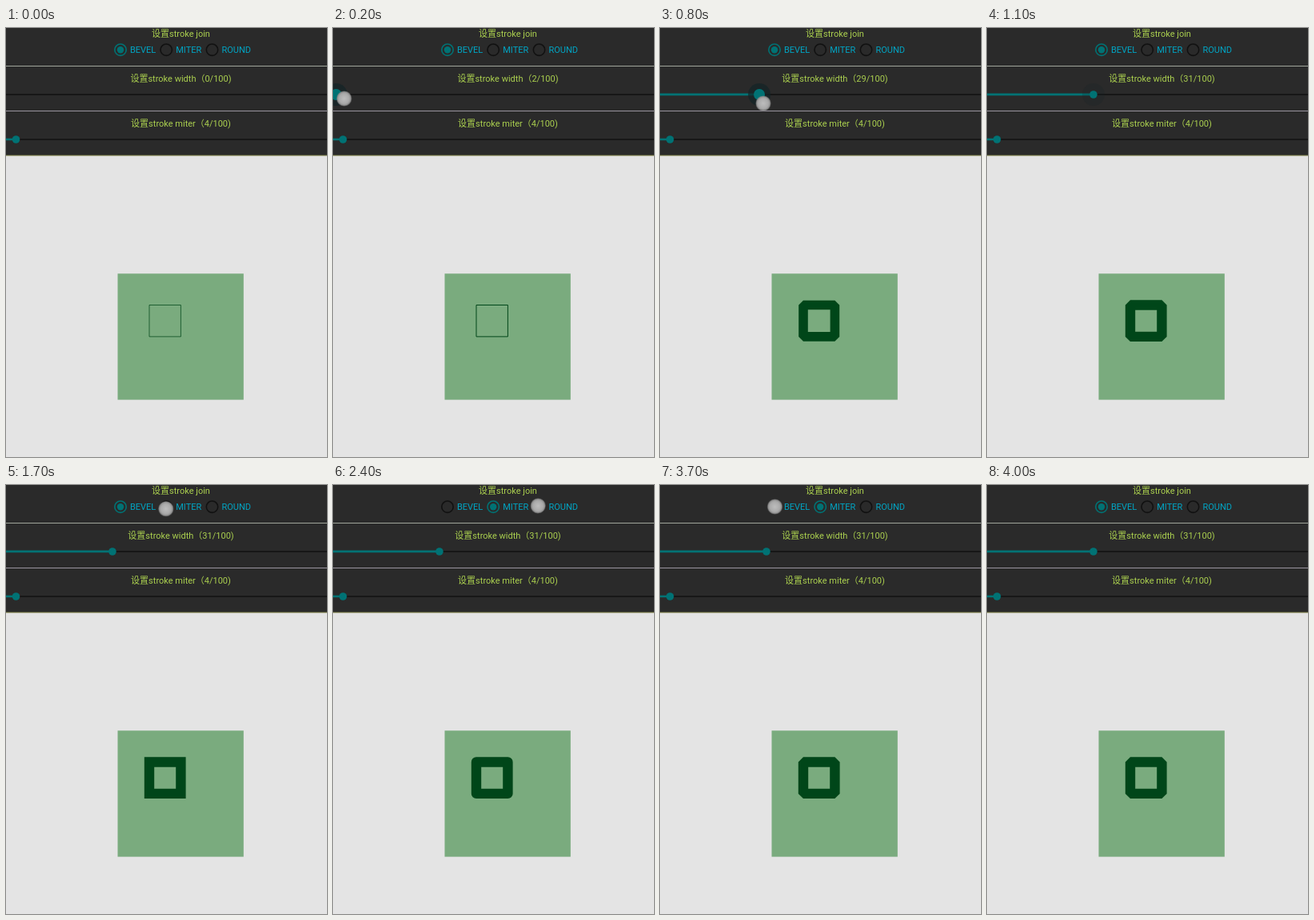
An HTML page that plays this animation: 401x535 px, repeating every 6.9 s.

```html
<!DOCTYPE html>
<html lang="zh">
<head>
<meta charset="utf-8">
<title>Stroke join</title>
<style>
  html, body { margin: 0; width: 100%; height: 100%; overflow: hidden; background: #e4e4e4; }
  svg { display: block; width: 100vw; height: 100vh; }
  text { font: 11px Roboto, "Noto Sans CJK SC", "Noto Sans CJK", sans-serif; fill: #abd04f; }
  .title { text-anchor: middle; }
  .label { fill: #00a5c4; }
  .track { fill: #121212; }
  .teal { fill: #007274; }
  .ring { fill: none; stroke-width: 1.6; }
</style>
</head>
<body>
<svg viewBox="0 0 401 535" preserveAspectRatio="none">
  <defs>
    <radialGradient id="finger">
      <stop offset="0" stop-color="#bdbdbd"/>
      <stop offset=".65" stop-color="#a9a9a9"/>
      <stop offset=".85" stop-color="#8f8f8f"/>
      <stop offset="1" stop-color="#777" stop-opacity=".25"/>
    </radialGradient>
  </defs>
  <rect width="401" height="535" fill="#e4e4e4"/>
  <rect width="401" height="159" fill="#2a2a2a"/>
  <rect y="47" width="401" height="1" fill="#a0a59b"/>
  <rect y="103" width="401" height="1" fill="#99949f"/>
  <rect y="158.5" width="401" height="1" fill="#85874d"/>

  <text class="title" x="218.5" y="11">设置stroke join</text>
  <g id="radios"></g>

  <text class="title" x="218.5" y="67" id="widthText"></text>
  <rect class="track" y="82.2" width="401" height="1.5"/>
  <rect class="teal" y="81.5" height="2.8" id="widthBar"/>
  <circle cy="83" r="14" fill="#122426" id="halo"/>
  <circle class="teal" cy="83" id="thumb"/>

  <text class="title" x="218.5" y="123">设置stroke miter（4/100)</text>
  <rect class="track" y="138.2" width="401" height="1.5"/>
  <rect class="teal" y="137.6" width="12.5" height="2.6"/>
  <circle class="teal" cx="12.5" cy="139" r="4.8"/>

  <rect x="139.5" y="306.3" width="157.3" height="157.3" fill="#7aab7e"/>
  <path id="square" d="M179 345.5h39.4v39.4h-39.4z" fill="none" stroke="#004619"/>
  <circle id="touch" r="9.8" fill="url(#finger)"/>
</svg>
<script>
const LOOP = 6900, STEP = 100;
const $ = id => document.getElementById(id);
const set = (el, attrs) => { for (const k in attrs) el.setAttribute(k, attrs[k]); };
const add = (tag, attrs) => {
  const el = document.createElementNS('http://www.w3.org/2000/svg', tag);
  set(el, attrs);
  return $('radios').appendChild(el);
};

const radios = [['BEVEL', 143], ['MITER', 200.2], ['ROUND', 257.5]].map(([name, cx]) => {
  add('text', { class: 'label', x: cx + 12, y: 31.3 }).textContent = name;
  return {
    ring: add('circle', { class: 'ring', cx, cy: 27.2, r: 7.2 }),
    dot: add('circle', { class: 'teal', cx, cy: 27.2 })
  };
});

// Stroke width at each step of the drag
const widths = [0, 0, 2, 5, 10, 16, 21, 26, 29, 30, 31];
const thumbX = v => 4.45 * v - 5;

// Taps on the radio buttons: touch step, step of the new join, option, position
const taps = [
  { at: 17, join: 17, pick: 1, x: 199.8, y: 29.7 },
  { at: 24, join: 24, pick: 2, x: 256.2, y: 26 },
  { at: 30, join: 31, pick: 1, x: 204.3, y: 26 },
  { at: 37, join: 37, pick: 0, x: 143.5, y: 27 }
];

function touchAt(step, x) {
  if (step >= 1 && step <= 10) {
    return { x: x + 10 - 5 * Math.max(0, step - 4) / 4, y: 86 + step, opacity: step > 9 ? .5 : 1 };
  }
  const tap = taps.find(p => step >= p.at && step < p.join + 2);
  return tap ? { x: tap.x, y: tap.y, opacity: step > tap.join ? .4 : 1 } : { x: 0, y: 0, opacity: 0 };
}

function draw(time) {
  const step = Math.floor(time % LOOP / STEP);
  const value = widths[Math.min(step, 10)];
  const x = thumbX(value);
  const dragging = step >= 1 && step <= 9;

  $('widthText').textContent = `设置stroke width（${value}/100)`;
  set($('widthBar'), { width: Math.max(0, x) });
  set($('thumb'), { cx: x, r: dragging ? 7 : 4.8 });
  set($('halo'), { cx: x, opacity: dragging ? .7 : step > 9 && step < 12 ? .7 - .25 * (step - 9) : 0 });

  let join = 0, picked = 0, previous = 0, grow = 1;
  for (const tap of taps) {
    if (step >= tap.join) join = tap.pick;
    if (step > tap.join) {
      previous = picked;
      picked = tap.pick;
      grow = step === tap.join + 1 ? .55 : 1;
    }
  }
  radios.forEach(({ ring, dot }, i) => {
    const amount = i === picked ? grow : i === previous ? 1 - grow : 0;
    set(ring, { stroke: i === picked ? '#007274' : '#111' });
    set(dot, { r: 4.2 * amount });
  });
  set($('square'), {
    'stroke-width': Math.max(1, value * .4),
    'stroke-opacity': value ? 1 : .75,
    'stroke-linejoin': ['bevel', 'miter', 'round'][join]
  });

  const touch = touchAt(step, x);
  set($('touch'), { cx: touch.x, cy: touch.y, opacity: touch.opacity });
}

const start = performance.now();
function tick() {
  draw(performance.now() - start);
  requestAnimationFrame(tick);
}
tick();
</script>
</body>
</html>
```
